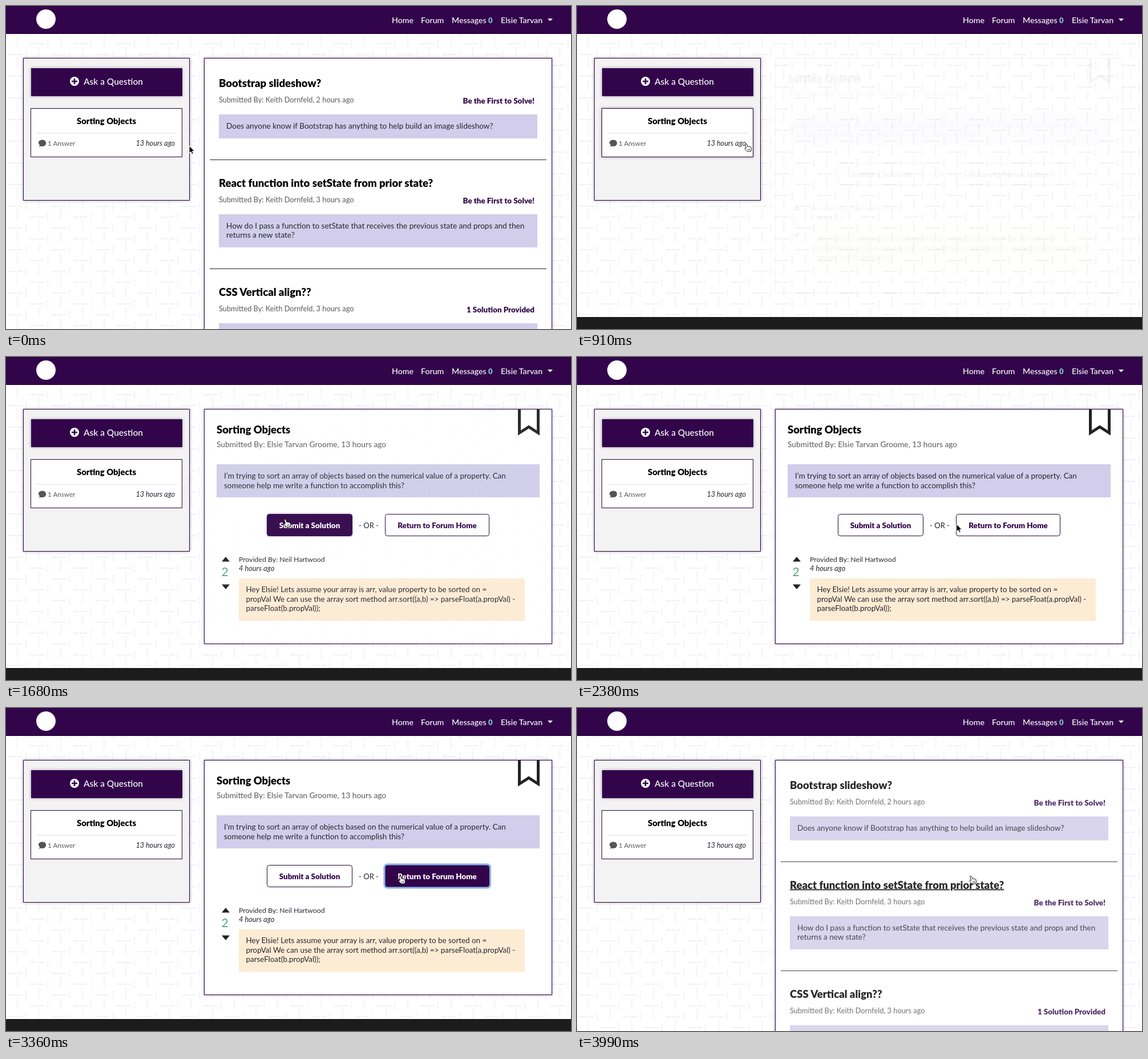
An HTML page for the animation above (4060 ms loop, 990x566 px).

```html
<!DOCTYPE html>
<html lang="en">
<head>
<meta charset="utf-8">
<title>Forum walkthrough</title>
<style>
  html, body { margin: 0; width: 100%; height: 100%; overflow: hidden; background: #fff; }
  svg { display: block; font-family: Lato, sans-serif; }
  text { white-space: pre; }
  .black { font-weight: 900; }
  .nav { font-weight: 500; fill: #fff; }
  .purple { fill: #32054b; }
  .muted { fill: #595959; }
  .body { fill: #262630; }
  .italic { font-style: italic; }
  .end { text-anchor: end; }
  .mid { text-anchor: middle; }
  .band { fill: #d1cdea; }
  .box { fill: #fff; stroke: #220535; }
  .glow { filter: drop-shadow(0 0 2.5px rgba(50, 5, 75, .4)); }
</style>
</head>
<body>
<svg id="stage" width="990" height="566" viewBox="0 0 990 566"></svg>
<script>
const LOOP = 4060, STEP = 70;
const OPEN_DETAIL = 840, OPEN_LIST = 3430;

const text = (x, y, size, words, cls = '', id = '') =>
  `<text id="${id}" x="${x}" y="${y}" font-size="${size}" class="${cls}">${words}</text>`;
const rect = (x, y, w, h, cls, extra = '') =>
  `<rect x="${x}" y="${y}" width="${w}" height="${h}" class="${cls}" ${extra}/>`;
const lines = (x, y, size, rows) =>
  rows.map((row, i) => text(x, y + i * 16.6, size, row, 'body')).join('');

const weave = `<pattern id="weave" width="76" height="38" patternUnits="userSpaceOnUse">
  <path d="M4 9h26M42 28h26" stroke="#f2f2f2" stroke-width="2.500" stroke-dasharray="9 1 5 1"/>
  <path d="M20 14v20M58 -5v20M58 33v20M35 2v14M73 21v14" stroke="#f7f7f7" stroke-width="3"/>
</pattern>`;

function post(y, title, hours, status, rows, id) {
  return text(373, y, 18.5, title, 'black', id) +
    text(373, y + 27, 12.8, `Submitted By: Keith Dornfeld, ${hours} hours ago`, 'muted') +
    text(926, y + 29, 13.4, status, 'black purple end') +
    rect(373, Math.floor(y + 48.5), 558, rows.length > 1 ? 58 : 42, 'band') +
    lines(386, y + 73, 13.55, rows);
}

function button(id, x, w, label) {
  const place = [x, 275.5, w, 38];
  const words = cls => text(x + w / 2, 300, 13.4, label, 'black mid ' + cls);
  return rect(...place, 'box', 'rx="4"') + words('purple') +
    `<g id="${id}">${rect(...place, 'purple glow', 'rx="4"')}
      <g fill="#fff">${words('')}</g></g>`;
}

const header = rect(0, 0, 990, 49, 'purple') +
  '<path d="M0 48.500H990" stroke="#1d022d"/><circle cx="70" cy="23" r="17" fill="#fff"/>' +
  text(676, 30, 14.2, 'Home', 'nav') + text(727, 30, 14.2, 'Forum', 'nav') +
  text(781, 30, 14.1, 'Messages', 'nav') +
  '<g fill="#7cc4cf">' + text(845, 30, 13, '0', 'black') + '</g>' +
  text(867, 30, 14.2, 'Elsie Tarvan', 'nav') +
  '<path d="M949 22h9l-4.500 4.500z" fill="#fff"/>';

const sidebar = rect(30.5, 91.5, 291, 249, 'box glow', 'style="fill:#f3f3f3"') +
  rect(44, 109, 265, 49, 'purple glow') +
  `<circle cx="120" cy="132" r="8" fill="#fff"/>
   <path d="M115 132h10M120 127v10" stroke="#32054b" stroke-width="2.600"/>` +
  text(136, 138, 15.5, 'Ask a Question', 'nav') +
  rect(43.5, 179.5, 265, 85, 'box', 'id="card"') +
  text(176, 207, 14.8, 'Sorting Objects', 'black mid') +
  `<path d="M53 223H300" stroke="#ddd"/>
   <path d="M57.500 246.500q2-2 1.500-3c-5-5 0-9 4.500-9c9 0 9 11.500 0 11.500q-2 0-3-.5q-1 1-3 1z" fill="#555"/>` +
  text(73, 245, 11.7, '1 Answer', 'muted') +
  text(296, 245, 12.6, '13 hours ago', 'body italic end');

const list = `<g id="list">${rect(347.5, 91.5, 609, 500, 'box glow')}<g id="posts">` +
  post(142, 'Bootstrap slideshow?', 2, 'Be the First to Solve!',
    ['Does anyone know if Bootstrap has anything to help build an image slideshow?']) +
  post(316.5, 'React function into setState from prior state?', 3, 'Be the First to Solve!',
    ['How do I pass a function to setState that receives the previous state and props and then',
     'returns a new state?'], 'hovered') +
  post(507.5, 'CSS Vertical align??', 3, '1 Solution Provided', ['']) +
  '<path d="M357 269.500H947M357 460.500H947" stroke="#222"/></g></g>';

const detail = `<g id="detail">${rect(347.5, 91.5, 609, 411, 'box glow')}
  <path d="M899.500 92V133L916 122.500 932.500 133V92" fill="none" stroke="#222" stroke-width="5"/>` +
  text(369, 134, 18.4, 'Sorting Objects', 'black') +
  text(369, 158, 13.8, 'Submitted By: Elsie Tarvan Groome, 13 hours ago', 'muted') +
  rect(369, 188, 566, 58, 'band') +
  lines(382, 213, 13.45, [
    'I’m trying to sort an array of objects based on the numerical value of a property. Can',
    'someone help me write a function to accomplish this?']) +
  button('submit', 457.5, 149, 'Submit a Solution') +
  text(635.5, 300, 13, '- OR -', 'body mid') +
  button('back', 664.5, 182, 'Return to Forum Home') +
  rect(663, 274, 185.5, 41, '', 'id="ring" rx="5" fill="none" stroke="#8db4ec" stroke-width="3"') +
  `<path d="M378 358.500L385 350 392 358.500zM378 398.500L385 407 392 398.500z" fill="#222"/>
   <g fill="#56a37c">${text(383.5, 384, 21, '2', 'mid')}</g>` +
  text(408, 359, 12.3, 'Provided By: Neil Hartwood', 'body') +
  text(408, 375, 12.8, '4 hours ago', 'body italic') +
  rect(408, 388, 501, 74.5, '', 'fill="#fdecd4"') +
  lines(420.5, 412, 13.4, [
    'Hey Elsie! Lets assume your array is arr, value property to be sorted on =',
    'propVal We can use the array sort method arr.sort((a,b) =&gt; parseFloat(a.propVal) -',
    'parseFloat(b.propVal));']) + '</g>';

const pointer = `<g id="cursor" stroke-linejoin="round">
  <path id="arrow" d="M0 0V13L3 10.300 5 14.500 7.300 13.500 5.300 9.300H9.300Z" fill="#000" stroke="#fff"/>
  <path id="hand" d="M-1.500 1.500Q0-.8 1.500 1.200L3 5.500Q4 4.500 5 5.300Q6.200 4.800 7 5.800Q8.600 5.600 9 7
    L9.500 11 8.500 14H2.500L-2 9.500Q-2.500 7.500 .5 8ZM4 9.500v2.500M6.500 9.500v2.500" fill="#fff" stroke="#111"/></g>`;

stage.innerHTML = `<defs>${weave}</defs>` + rect(0, 0, 990, 566, '', 'fill="url(#weave)"') +
  rect(0, 545, 990, 21, '', 'id="footer" fill="#1c1c1c"') + header + sidebar + list + detail + pointer;

const el = id => document.getElementById(id);
const show = (id, on) => { el(id).style.opacity = +on; };
const clamp = v => Math.max(0, Math.min(1, v));
const fadeIn = (t, start) => 1 - (1 - clamp((t - start) / 1000)) ** 2;
const hover = (t, from, to) => clamp((t - from) / 150) - clamp((t - to) / 150);

// time, x, y of the pointer tip
const path = [[0, 321, 245], [140, 321, 245], [400, 296, 241], [1050, 296, 241], [1650, 489, 284],
  [1900, 489, 284], [2380, 665, 293], [2600, 690, 294], [LOOP, 690, 294]];

function pointerAt(t) {
  const i = path.findIndex(p => p[0] > t), [a, b] = [path[i - 1], path[i]];
  const k = (t - a[0]) / (b[0] - a[0]), s = k * k * (3 - 2 * k);
  return [a[1] + (b[1] - a[1]) * s, a[2] + (b[2] - a[2]) * s];
}

function draw(now) {
  const t = Math.floor(now % LOOP / STEP) * STEP;
  const inDetail = t >= OPEN_DETAIL && t < OPEN_LIST, returned = t >= OPEN_LIST;
  const [x, y] = pointerAt(t);
  const overCard = x < 309;
  const pointing = overCard || x > 457 && x < 607 || x > 666;

  show('list', !inDetail);
  show('posts', returned ? fadeIn(t, 3390) : 1);
  show('detail', inDetail ? fadeIn(t, 890) : 0);
  show('footer', inDetail);
  show('submit', hover(t, 1500, 2190));
  show('back', hover(t, 2400, LOOP));
  show('ring', t >= 3220);
  show('arrow', !pointing);
  show('hand', pointing);
  el('hovered').style.textDecoration = returned ? 'underline' : 'none';
  el('card').classList.toggle('glow', overCard);
  el('cursor').setAttribute('transform', `translate(${x} ${y})`);
  requestAnimationFrame(draw);
}
requestAnimationFrame(draw);
</script>
</body>
</html>
```
